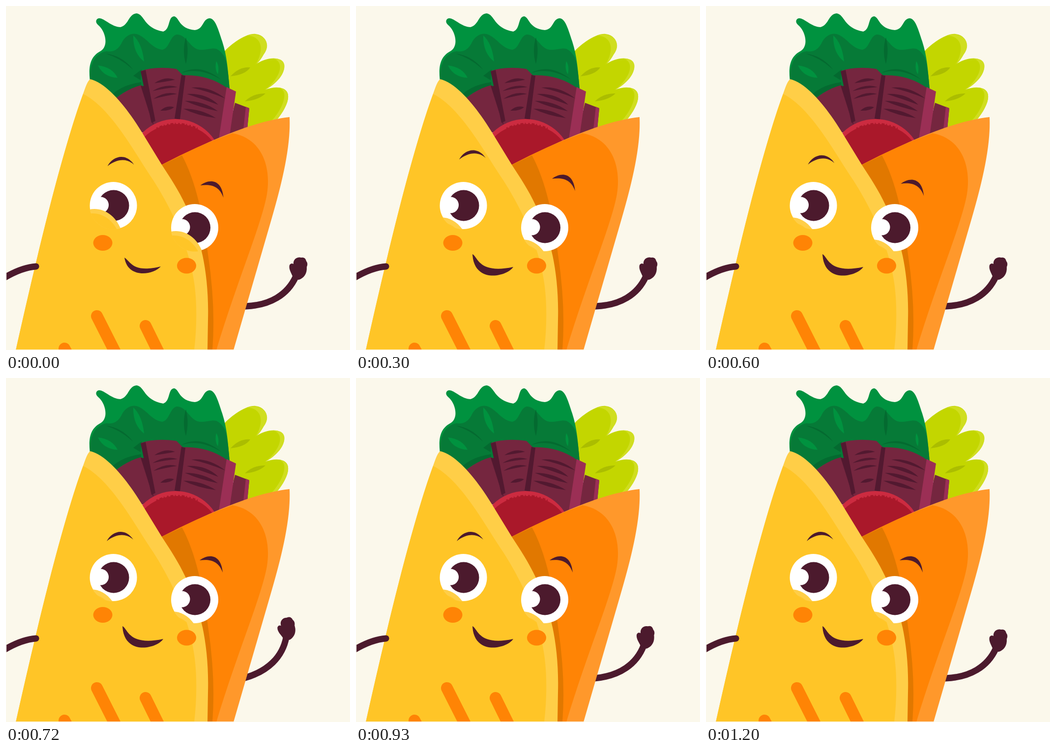
These frames come from a looping animation (700 px wide and 700 px high, 1870 ms). An HTML page:

```html
<!DOCTYPE html>
<html lang="en">
<head>
<meta charset="utf-8">
<title>Waving wrap</title>
<style>
html, body { margin: 0; height: 100%; overflow: hidden; background: #fbf8eb; }
svg { display: block; width: 100vw; height: 100vh; }
.ink { fill: #4c1a2d; }
.limb { fill: none; stroke: #4c1a2d; stroke-width: 13; stroke-linecap: round; }
.meat { fill: #75263f; }
.meat-dark { fill: #521930; }
.meat-light { fill: #9b2f55; }
.leaf { fill: #00923f; }
.leaf-mid { fill: #067a37; }
.leaf-dark { fill: #046a30; }
.orange { fill: #ff8405; }
.yellow { fill: #ffc527; }
.yellow-light { fill: #ffce47; }
</style>
</head>
<body>
<svg viewBox="0 0 700 700">
  <defs>
    <clipPath id="eyeClip"><circle r="48.6"/></clipPath>
    <path id="lidShape" d="M-60 12C-30-2 5 14 18 56L-60 60Z"/>
    <g id="eye">
      <circle r="48" fill="#fff"/>
      <circle class="ink" cx=".5" r="31.500"/>
      <circle cx="-26" cy="-1" r="16.500" fill="#fff"/>
      <g clip-path="url(#eyeClip)">
        <g id="lid">
          <use href="#lidShape" class="yellow-light"/>
          <use href="#lidShape" class="yellow" x="-4" y="9"/>
        </g>
      </g>
    </g>
  </defs>

  <!-- celery -->
  <path fill="#c3d600" d="M443 94C460 75 490 55 508 57C531 60 537 82 524 99Q518 110 511 117C525 108 548 102 560 111C573 122 563 142 550 154Q540 164 528 170C545 164 567 163 573 177C578 192 565 214 550 233L490 255L440 170Z"/>
  <path fill="#d0de20" d="M490 60C522 50 543 75 524 99Q518 110 508 119C522 97 527 62 490 60ZM545 107C577 106 569 136 550 154Q540 164 526 171C555 150 570 116 545 107ZM556 167C587 170 574 205 550 233L538 236C562 213 578 172 556 167Z"/>
  <path fill="#abbd00" d="M457 143Q475 123 497 125Q487 140 457 143ZM486 194Q503 177 528 178Q513 192 486 194Z"/>

  <!-- lettuce -->
  <path class="leaf" d="M172 160C167 128 169 104 192 92C209 82 203 54 190 41Q180 33 185 27C195 18 212 43 233 43C250 39 249 16 266 15C282 17 280 45 320 52C335 47 329 22 342 21C353 23 351 46 384 49C403 47 399 27 414 25C426 25 432 48 440 72C450 102 452 135 455 170L300 240Z"/>
  <path class="leaf-mid" d="M172 160C167 122 180 96 205 92Q226 96 237 72C247 56 261 54 271 59C290 69 297 86 318 89C333 87 334 58 349 58C369 60 374 86 394 89C412 90 424 82 433 90Q444 98 448 112Q453 140 455 170L300 240Z"/>
  <path class="leaf" d="M259 60Q277 76 281 113Q258 95 259 60ZM187 121Q216 124 227 146Q199 145 187 121ZM428 112Q435 124 431 139Q424 128 428 112Z"/>
  <path class="leaf-dark" d="M366 64Q373 90 366 118Q358 91 366 64ZM203 97Q237 101 259 130Q233 106 203 97ZM357 136Q395 116 438 150Q395 124 357 136ZM216 180Q238 160 275 155L275 164Q244 170 222 188ZM259 142L276 129L274 151Z"/>

  <!-- meat -->
  <path class="meat" d="M223 188Q248 168 275 161L310 245L276 258ZM466 197L495 208L490 260L445 285Z"/>
  <path class="meat-light" d="M488 205L495 208L490 260L482 260Z"/>
  <path class="meat-dark" d="M274 162L286 164L304 238L299 241Z"/>
  <path class="meat" d="M275 132Q304 122 347 128L360 141Q411 139 450 167L433 290L300 240Z"/>
  <path class="meat-light" d="M449 165L468 174L452 285L430 290Z"/>
  <path class="meat-dark" d="M274 133L284 130L304 234L296 238ZM357 140L365 142L354 231L343 229Z"/>
  <path class="meat-dark" d="M302 157Q324 142 344 150Q326 154 302 157ZM298 173Q325 157 349 165Q325 167 298 173ZM300 189Q325 172 348 179Q327 182 300 189ZM314 213Q327 201 342 206Q333 214 314 213Z"/>
  <path class="meat-dark" d="M377 166Q413 162 446 188Q410 173 377 166ZM368 179Q408 177 432 201Q399 189 368 179ZM364 193Q403 193 431 214Q396 207 364 193ZM361 209Q397 209 427 228Q389 223 361 209Z"/>

  <!-- tomato -->
  <circle cx="345" cy="325" r="95" fill="#cc2b40"/>
  <circle cx="347" cy="334" r="94" fill="#aa182a"/>
  <path fill="none" stroke="#aa182a" stroke-width="3" stroke-dasharray="3 4 6 3 2 5" d="M306 249Q348 229 392 250"/>

  <g id="arm">
    <path class="limb" d="M472 612L488 611C537 609 573 588 590 550"/>
    <path class="ink" d="M585 557C584 547 574 537 577 527Q580 522 585 525C584 515 593 510 600 512Q609 510 611 519Q615 524 612 531C613 546 605 554 596 557Z"/>
  </g>

  <!-- back flap -->
  <path fill="#ff982b" d="M317 323C405 279 497 235 577 226C580 290 559 370 537 445L463 700H380Z"/>
  <path class="orange" d="M317 323Q390 284 461 259C515 268 541 319 531 383C520 445 470 560 428 700H380Z"/>
  <path fill="#e17800" d="M317 323L358 304C386 355 402 430 411 505Q427 610 420 700H380Z"/>

  <!-- front flap -->
  <path class="yellow-light" d="M172 149C204 157 243 202 276 256L317 323C349 373 416 462 411 640L410 700H20C58 530 112 300 160 170Q167 150 172 149Z"/>
  <path class="yellow" d="M157 179C215 208 262 300 300 355C345 425 375 500 384 570Q391 630 383 700H20C58 530 112 300 157 179Z"/>
  <path fill="none" stroke="#ff8405" stroke-width="24" stroke-linecap="round" d="M185 631L226 712M284 651L315 714M119 697L128 714"/>
  <path class="limb" d="M-10 557Q30 532 61 530"/>

  <!-- face -->
  <ellipse class="orange" cx="197" cy="482" rx="19.500" ry="16"/>
  <ellipse class="orange" cx="367.500" cy="528.500" rx="19.500" ry="16"/>
  <use href="#eye" x="218.500" y="406"/>
  <use href="#eye" x="384" y="451"/>
  <path id="brows" class="ink" d="M205 332C215 312 242 303 259 329C244 315 224 317 205 332ZM394 371C412 357 438 358 441 396C433 372 415 368 394 371Z"/>
  <path id="mouth" class="ink"/>

  <path fill="none" stroke="#fbf8eb" d="M.5 0V699.500H700"/>
</svg>
<script>
const LOOP = 1870, STEP = 30;
const $ = id => document.getElementById(id);
const clamp = x => Math.min(1, Math.max(0, x));
const lerp = (a, b, k) => a + (b - a) * k;

// time, vertical offset
const browKeys = [[0, -6], [150, -10], [300, -19.5], [375, -25.5], [450, -21], [540, -15.5], [690, 0], [LOOP, 0]];
const smallSmile = [241, 512, 254, 520, 258, 544, 315, 530, 300, 547, 248, 556, 241, 512];
const bigSmile = [237, 505, 248, 510, 249, 546, 320, 531, 307, 551, 240, 566, 237, 505];

function keyed(keys, t) {
  const i = keys.findIndex(key => key[0] > t);
  const [t0, a] = keys[i - 1], [t1, b] = keys[i];
  return lerp(a, b, (t - t0) / (t1 - t0));
}

function draw(now) {
  const t = Math.floor(now % LOOP / STEP) * STEP;

  const phase = Math.min(t, 1200) / 300 % 1;
  const wave = 1 - Math.abs(1 - 2 * phase);
  $('arm').setAttribute('transform', `rotate(${-17 * wave} 484 621)`);

  const open = clamp(t / 300) ** 1.7;
  $('lid').setAttribute('transform', `translate(${-8 * open} ${17 * open})`);

  const lift = keyed(browKeys, t);
  $('brows').setAttribute('transform', `translate(${-0.25 * lift} ${lift})`);

  const grin = clamp(t / 150);
  const p = smallSmile.map((v, i) => lerp(v, bigSmile[i], grin));
  $('mouth').setAttribute('d', `M${p.slice(0, 2)}C${p.slice(2)}Z`);

  requestAnimationFrame(() => draw(performance.now()));
}
draw(performance.now());
</script>
</body>
</html>
```
